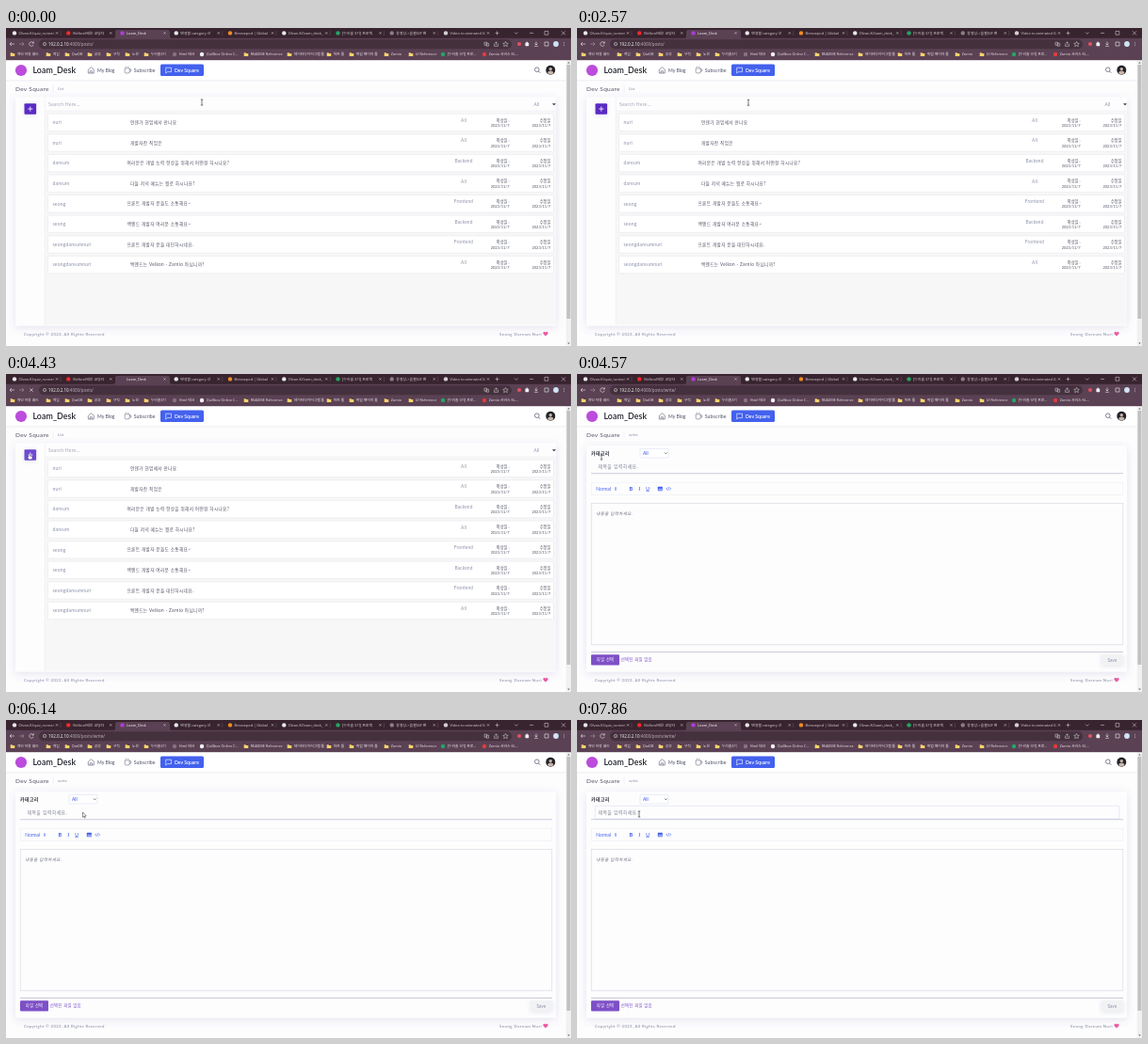
Recreate the animation shown at these times as an HTML page. Size 600 by 338 pixels, loop 8000 ms.

```html
<!DOCTYPE html>
<html lang="ko">
<head>
<meta charset="utf-8">
<title>Loam_Desk</title>
<style>
html, body { margin: 0; width: 100%; height: 100%; overflow: hidden; background: #fdfdfe; }
svg { display: block; width: 600px; height: 338px; }
text { font-family: Lato, "Noto Sans CJK KR", "Noto Sans CJK", sans-serif; white-space: pre; }
.ui text { font-family: "Open Sans", "Noto Sans CJK KR", "Noto Sans CJK", sans-serif; }
</style>
</head>
<body>
<svg id="stage" viewBox="0 0 600 338"></svg>
<script>
const BLUE = '#4361ee', GRAY = '#8d92aa', INK = '#4a4d66', PURPLE = '#7d50c6';
const STRIP = '#38242f', BAR = '#5a4153', PILL = '#45313e', PAPER = '#fdfdfe';

// y is the vertical centre of the text
const text = (x, y, s, size, fill, more = '') =>
  `<text x="${x}" y="${y + size * 0.36}" font-size="${size}" fill="${fill}" ${more}>${s}</text>`;
const rect = (x, y, w, h, fill, more = '') =>
  `<rect x="${x}" y="${y}" width="${w}" height="${h}" fill="${fill}" ${more}/>`;
const dot = (x, y, r, fill, more = '') =>
  `<circle cx="${x}" cy="${y}" r="${r}" fill="${fill}" ${more}/>`;
const line = (d, stroke, w = 0.6, more = '') =>
  `<path d="${d}" fill="none" stroke="${stroke}" stroke-width="${w}" ${more}/>`;
const cross = (x, y, r) => `M${x - r} ${y - r}l${2 * r} ${2 * r}m0 ${-2 * r}l${-2 * r} ${2 * r}`;
const spaced = n => ` letter-spacing="${n}"`;
const END = 'text-anchor="end"', MID = 'text-anchor="middle"', BOLD = 'font-weight="600"';

function tabStrip() {
  const tabs = [
    ['Olvan-K/quiz_runner', '#e8e8ea'], ['(Velkon)배운 코딩타', '#f02b2b'],
    ['Loam_Desk', '#b03bd8'], ['변경할 category 선', '#e8e8ea'],
    ['Breezepod | Global', '#ef8a22'], ['Olvan-K/loam_desk_', '#e8e8ea'],
    ['[누리솔 3기] 프로젝', '#24a566'], ['동영상->움짤GIF 변', '#8a7c87'],
    ['Video to animated G', '#d5d0d4']];
  let s = rect(0, 0, 600, 12, STRIP) +
    `<path d="M114 11q2 0 2-2v-5q0-2 2-2h54q2 0 2 2v5q0 2 2 2z" fill="${BAR}"/>`;
  tabs.forEach(([name, color], i) => {
    const x = 9 + 57.25 * i;
    const active = i == 2;
    s += dot(x, 5.4, 2.2, color, active ? 'id="favicon"' : '') +
      text(x + 4.6, 5.4, name, 3.9, active ? '#fff' : '#d8ced5') +
      line(cross(x + 45, 5.4, 1.1), '#e4dce2', 0.5);
    if (i < 8 && i != 1 && i != 2) s += line(`M${x + 49} 3v5`, '#7a6173', 0.4);
  });
  return s + line('M519.5 5.4h4M521.5 3.4v4M540 4.5l1.8 1.8 1.8-1.8M556 5.4h4M572 3.4h3.8v3.8h-3.8z' +
    cross(592, 5.4, 2), '#eee6eb', 0.5);
}

function toolbar() {
  return rect(0, 10.8, 600, 23.4, BAR) + rect(35, 12.3, 502, 10, PILL, 'rx="5"') +
    line('M9 17h-5m2-2l-2 2 2 2', '#eee') + line('M14 17h5m-2-2l2 2-2 2', '#a9979f') +
    `<g id="reload">${line('M29 15.8a2.3 2.3 0 1 0 .2 2M29.3 14.3v1.8h-1.8', '#eee')}</g>` +
    `<g id="stop">${line(cross(27, 17, 1.7), '#eee')}</g>` +
    dot(41, 17, 1.7, 'none', 'stroke="#ddd" stroke-width=".5"') + line('M41 16.7v1.3M41 15.8v.4', '#ddd', 0.5) +
    '<text x="45" y="18.6" font-size="4.5" fill="#fff">192.0.2.10<tspan id="path" fill="#c4b5be"></tspan></text>' +
    line('M508 15.2h2.6v3h-2.6zM510.2 16.2h2.4v3h-2.4zM518.5 16.5v2.8h4v-2.8M520.5 18v-3.2m-1.2 1.2l1.2-1.2 1.2 1.2', '#ddd', 0.5) +
    line('M530.5 14.4l.8 1.8 2 .2-1.5 1.3.5 2-1.8-1.1-1.8 1.1.5-2-1.5-1.3 2-.2z', '#ddd', 0.5) +
    dot(545, 17, 2.1, '#e0525f') + rect(551.4, 15.4, 3.8, 3.8, '#eee', 'rx=".6"') + dot(553.2, 15.2, 0.8, '#eee') +
    line('M563 14.4v3.6m-1.5-1.5l1.5 1.5 1.5-1.5M561 19.3h4', '#eee') +
    line('M572 15h4v4h-4z', '#eee') + dot(584, 17, 2.9, '#cfe3f4') +
    [15.2, 17, 18.8].map(y => dot(592.5, y, 0.45, '#eee')).join('');
}

function bookmarks() {
  const marks = [
    [7, '개인 자동 해드'], [45, '게임'], [65, 'QarDB'], [89, '공부'], [109, '구직'], [129, '노션'],
    [149, '누리솔3기'], [179, 'Html 태크', '#8d6f85'], [208, 'Quillbox Online C...', '#f4f4f4'],
    [255, 'README Reference'], [301, '데이터다이어그램 툴'], [343, '차트 툴'], [367, '취업 페이지 툴'],
    [404, 'Zarnio'], [430, 'UI Reference'], [464, '[누리솔 3기] 프로...', '#24a566'],
    [508, 'Zarnio 서비스 KL...', '#e23b3b']];
  return marks.map(([x, name, color]) =>
    (color ? dot(x, 28, 2.2, color)
      : `<path d="M${x - 2.3} 26.2h1.8l.6.7h2.2v3.2h-4.6z" fill="#f8d36b"/>`) +
    text(x + 4.7, 28, name, 3.8, '#efe7ec')).join('');
}

function siteHeader() {
  return rect(0, 34, 600, 304, PAPER) + rect(0, 34, 595, 21, '#fff') +
    rect(0, 55, 595, 0.6, '#e8eaf1') + rect(0, 55.6, 595, 1.5, '#f7f7fa') +
    dot(16, 45, 6.1, '#bb4cdc') +
    text(28.5, 45, 'Loam_Desk', 8.8, '#1c1e28', BOLD + spaced(0.1)) +
    line('M87.3 44.3l3-2.6 3 2.6v3.7h-6zM89.2 48v-2.3h2.2V48', INK, 0.55) +
    text(97, 45, 'My Blog', 5.1, INK) +
    line('M126.2 42.8h5v3.8q0 1.3-1.3 1.3h-2.4q-1.3 0-1.3-1.3zM131.2 43.6q1.8 0 1.8 1.4t-1.8 1.4M127.5 40.6v1.2M129.7 40.6v1.2', INK, 0.5) +
    text(135.7, 45, 'Subscribe', 5.2, INK, spaced(0.1)) +
    rect(164, 38.4, 46, 12.7, BLUE, 'rx="1.6"') +
    line('M169.7 42.2h5.8v4.4h-4l-1.8 1.5z', '#fff', 0.6, 'stroke-linejoin="round"') +
    text(179, 45, 'Dev Square', 5.1, '#fff', BOLD) +
    dot(563.8, 44.2, 2.3, 'none', `stroke="${INK}" stroke-width=".7"`) + line('M565.5 46l1.8 1.8', INK, 0.7) +
    dot(578.3, 44.8, 5, '#222329') + dot(578.3, 43.6, 1.7, '#c8b6aa') +
    '<path d="M575.2 48.3q0-2.7 3.1-2.7t3.1 2.7q-3.1 2.3-6.2 0z" fill="#c8b6aa"/>' +
    text(10, 64.2, 'Dev Square', 6.5, '#515365', spaced(0.3)) +
    line('M50 60.5v8', '#dcdee6', 0.4) +
    `<text id="crumb" x="55" y="65.6" font-size="4.3" fill="${GRAY}"></text>`;
}

function siteFooter() {
  return text(19, 325, 'Copyright © 2023, All Rights Reserved', 4.2, GRAY, BOLD + spaced(0.4)) +
    text(569, 325, 'Seong Dareum Nuri', 4.3, GRAY, END + ' ' + BOLD + spaced(0.45)) +
    '<path d="M573 327.6l-2.4-2.4q-.8-1.8.8-2.4 1.1-.1 1.6 1 .5-1.1 1.6-1 1.6.6.8 2.4z" fill="#ec5aa0"/>' +
    rect(594.8, 34.2, 5.2, 303.8, '#f1f1f1') + rect(595.4, 39, 4, 270, '#c1c1c1') +
    '<path d="M596.2 37.4l1.3-1.5 1.3 1.5zM596.2 334.4l1.3 1.5 1.3-1.5z" fill="#606060"/>';
}

const card = (y, h) => rect(10, y, 574, h, PAPER, 'rx="1.5" filter="url(#glow)"');

function listPage() {
  const rows = [
    ['nuri', 132, '언젠가 현업에서 만나요', 'All'],
    ['nuri', 132, '개발자란 직업은', 'All'],
    ['dareum', 128.5, '여러분은 개발 능력 향상을 위해서 어떤걸 하시나요?', 'Backend'],
    ['dareum', 132, '다들 저녁 메뉴는 뭘로 하시나요?', 'All'],
    ['seong', 128.5, '프론트 개발자 분들도 소통해요~', 'Frontend'],
    ['seong', 128.5, '백엔드 개발자 여러분 소통해요~', 'Backend'],
    ['seongdareumnuri', 128.5, '프론트 개발자 분들 대단하시네요.', 'Frontend'],
    ['seongdareumnuri', 132, '백엔드는 Velkon - Zarnio 아닙니까?', 'All']];
  let s = card(73.5, 243) + rect(41.5, 88, 542.5, 227.5, '#f7f7f8') +
    line('M41.3 73.5v242.5', '#e6e8ee', 0.5) + line('M41.5 88h542.5', '#e8eaf0', 0.5) +
    rect(19.5, 80.2, 12.6, 11.6, '#5a2bc4', 'id="add" rx="1" filter="url(#shadow)"') +
    line('M25.8 83.4v5.2M23.2 86h5.2', '#fff', 0.8) +
    text(45, 81, 'Search Here...', 5, '#a3a6b4', spaced(0.25)) +
    text(560.5, 81, 'All', 4.8, GRAY) + '<path d="M580 80.2h4l-2 2.1z" fill="#333"/>';
  rows.forEach(([who, x, title, kind], i) => {
    const y = 100.4 + 21.6 * i;
    s += rect(44.5, y - 9.2, 537, 18.4, '#fff', 'rx="1" stroke="#e2e3e8" stroke-width=".5"') +
      text(49.5, y, who, 5.1, GRAY, spaced(0.15)) +
      text(x, y, title, 4.65, '#515365', spaced(0.35)) +
      text(486, y - 2.3, kind, 4.8, GRAY, MID + spaced(0.15));
    [[534.5, '작성일 :'], [578.3, '수정일']].forEach(([right, label]) => {
      s += text(right, y - 2.3, label, 4.2, '#515365', END) + text(right, y + 3.2, '2023/11/7', 4, '#515365', END);
    });
  });
  return s;
}

function writePage() {
  return card(76, 240.5) +
    text(15, 84, '카테고리', 4.9, '#2c2e3b', BOLD + spaced(0.45)) +
    rect(67, 79.4, 30, 9.6, '#fff', 'rx="1" stroke="#d3d9ee" stroke-width=".5"') +
    text(70, 84.2, 'All', 4.8, BLUE, BOLD) + line('M93 83.5l1.3 1.3 1.3-1.3', '#333', 0.7) +
    rect(19.3, 91.3, 556.5, 13.8, PAPER, 'id="field" rx="1" stroke="#cdd3e6" stroke-width=".5"') +
    text(22.5, 98.4, '제목을 입력하세요.', 4.8, '#777b8e', spaced(0.5)) + line('M15 105.7h565', '#a9aec6', 0.6) +
    rect(15.2, 115.2, 564.6, 13.3, PAPER, 'stroke="#e8eaf2" stroke-width=".5"') +
    text(20.3, 122, 'Normal', 4.9, BLUE) +
    `<path d="M39.9 121.6l1.1-1.5 1.1 1.5zM39.9 122.4l1.1 1.5 1.1-1.5z" fill="${BLUE}"/>` +
    text(57.3, 122, 'B', 5.4, BLUE, MID + ' font-weight="800"') +
    text(66.3, 122, 'I', 5.4, BLUE, MID + ' font-style="italic" font-weight="700"') +
    text(75, 121.8, 'U', 5, BLUE, MID + ' ' + BOLD) + line('M73 124.5h4', BLUE, 0.5) +
    rect(85.8, 119.8, 5, 4.4, BLUE, 'rx=".5"') + line('M86.6 123.3l1.1-1.5 1 .9.8-.7.8 1.3z', '#fff', 0.5) +
    line('M96 120.6l-1.4 1.4 1.4 1.4M98.4 120.6l1.4 1.4-1.4 1.4M97.7 120.2l-1 3.6', BLUE, 0.6) +
    rect(15.2, 137.5, 564.6, 150.3, PAPER, 'stroke="#d3d5de" stroke-width=".6"') +
    text(20.3, 148.2, '내용을 입력하세요.', 4.4, '#666a78', 'font-style="italic"' + spaced(0.45)) +
    line('M15 295.5h565', '#a9acbb', 0.6) +
    rect(15, 298.2, 30, 11.2, PURPLE, 'rx="1"') +
    text(30.2, 303.6, '파일 선택', 4.2, '#fff', MID + spaced(0.35)) +
    text(46.7, 303.4, '선택된 파일 없음', 4.4, PURPLE, spaced(0.3)) +
    rect(557, 298.5, 23, 11, '#f1f2f4', 'rx="1.2" filter="url(#shadow)"') +
    text(568.4, 304, 'Save', 4.8, GRAY, MID);
}

const shapes = {
  beam: line('M-1.2-3h2.4M0-3v6M-1.2 3h2.4', '#222'),
  arrow: '<path d="M0 0v5.4l1.2-1.1.8 1.8.8-.4-.8-1.7h1.7z" fill="#fff" stroke="#111" stroke-width=".45"/>',
  hand: '<path d="M-.6 0q.6-.7 1.2 0v2l2.5.6q.6.2.4 1l-.6 2.2h-3l-1.9-2.4q.3-.8 1.4 0z" fill="#fff" stroke="#222" stroke-width=".35"/>'
};

const blur = (id, y, size, alpha) =>
  `<filter id="${id}" x="-20%" y="-20%" width="140%" height="160%">
  <feDropShadow dx="0" dy="${y}" stdDeviation="${size}" flood-color="#5e5c9a" flood-opacity="${alpha}"/></filter>`;

const stage = document.getElementById('stage');
stage.innerHTML = `<defs>${blur('shadow', 1, 2, 0.16)}${blur('glow', 2, 4, 0.16)}</defs>
  ${siteHeader()}<g id="list">${listPage()}</g><g id="write">${writePage()}</g>${siteFooter()}
  <g class="ui">${tabStrip()}${toolbar()}${bookmarks()}</g>
  <g id="cursor">${Object.keys(shapes).map(k => `<g id="${k}">${shapes[k]}</g>`).join('')}</g>`;

const $ = id => document.getElementById(id);
const show = (id, on) => $(id).setAttribute('visibility', on ? 'visible' : 'hidden');

// Pointer keys: step, x, y
const LOAD = 31, WRITE = 32, HOVER = 47;
const keys = [[0, 208, 79], [17, 208, 79], [21, 104, 80], [23, 104, 80], [24, 101, 80], [29, 27, 85],
  [31, 24.5, 85], [32, 26, 88], [39, 82, 99], [40, 81.5, 98], [45, 81.5, 98], [51, 70, 99],
  [53, 70, 99], [55, 66, 100]];

function pointer(step) {
  const i = Math.max(1, keys.findIndex(k => k[0] >= step));
  const [a, b] = [keys[i - 1], keys[i]];
  const p = (step - a[0]) / (b[0] - a[0]);
  return [a[1] + (b[1] - a[1]) * p, a[2] + (b[2] - a[2]) * p];
}

function pointerShape(step, x) {
  if (step >= WRITE) return step == WRITE || step >= HOVER ? 'beam' : 'arrow';
  return x > 42 ? 'beam' : x > 32 ? 'arrow' : 'hand';
}

function draw(now) {
  // the screen refreshes seven times a second
  const step = Math.min(55, Math.floor((now % 8000 + 8) * 7 / 1000));
  const writing = step >= WRITE, loading = step == LOAD;
  const [x, y] = pointer(step);
  const shape = pointerShape(step, x);
  show('list', !writing);
  show('write', writing);
  show('field', step >= HOVER);
  show('favicon', !loading);
  show('reload', !loading);
  show('stop', loading);
  $('crumb').textContent = writing ? 'write' : 'List';
  $('path').textContent = writing ? ':4000/posts/write/' : ':4000/posts/';
  $('add').setAttribute('fill', shape == 'hand' ? '#6f48d2' : '#5a2bc4');
  $('cursor').setAttribute('transform', `translate(${x} ${y})`);
  for (const k in shapes) show(k, k == shape);
  requestAnimationFrame(draw);
}
requestAnimationFrame(draw);
</script>
</body>
</html>
```
